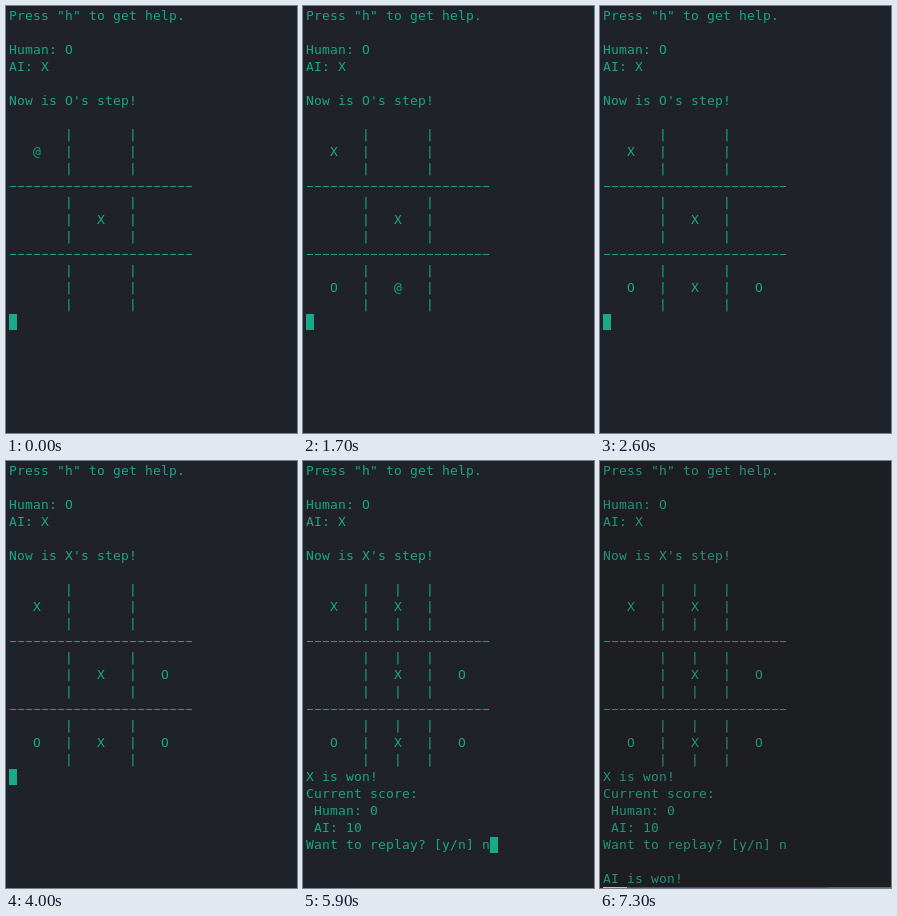
Recreate the animation shown at these times as an HTML page. Size 291 px wide and 427 px high, loop 7500 ms.

```html
<!DOCTYPE html>
<html lang="en">
<head>
<meta charset="utf-8">
<title>Tic-tac-toe in a terminal</title>
<style>
  html, body { margin: 0; width: 100%; height: 100%; overflow: hidden; }
  #screen { position: relative; width: 291px; height: 427px; overflow: hidden;
            background: #1f2229; color: #1aa586; }
  #screen.dim { background: #1c1e22; color: #24917a; }
  #screen > * { position: absolute; }
  /* One character per 8 x 17 px cell, whatever the measured advance is. */
  #lines { left: 3px; top: 1px; margin: 0; font: 13px/17px "DejaVu Sans Mono", monospace;
           letter-spacing: calc(8px - 1ch); font-variant-ligatures: none; }
  .rule { left: 4px; width: 182px; height: 1px;
          background: repeating-linear-gradient(90deg, currentColor 0 6px, transparent 6px 8px); }
  #cursor { width: 8px; height: 16px; background: #1aa88a; }
  #prompt { left: 3px; top: 426px; width: 288px; height: 1px;
            background: linear-gradient(90deg, #f4f5f5 24px, #23788c 24px 225px, #5f9a2c 225px); }
  .dim #prompt { opacity: .75; }
</style>
</head>
<body>
<div id="screen">
  <pre id="lines"></pre>
  <div class="rule" style="top: 180px"></div>
  <div class="rule" style="top: 248px"></div>
  <div id="cursor"></div>
  <div id="prompt"></div>
</div>
<script>
const LOOP = 7500, CELL_W = 8, CELL_H = 17, LEFT = 3, TOP = 2;
const $ = id => document.getElementById(id);

// Cells run left to right, top to bottom; "@" is the selection.
const steps = [
  { at: 0,    cells: "@   X    ", turn: "O" },
  { at: 300,  cells: "   @X    ", turn: "O" },
  { at: 600,  cells: "    X @  ", turn: "O" },
  { at: 1000, cells: "    X O  ", turn: "X" },
  { at: 1100, cells: "X   X O  ", turn: "O" },
  { at: 1700, cells: "X   X O@ ", turn: "O" },
  { at: 2200, cells: "X   X O @", turn: "O" },
  { at: 2600, cells: "X   X OXO", turn: "O" },
  { at: 3400, cells: "X   X@OXO", turn: "O" },
  { at: 4000, cells: "X   XOOXO", turn: "X" },
  { at: 4100, cells: "XX  XOOXO", turn: "X", won: true },
  { at: 5900, cells: "XX  XOOXO", turn: "X", won: true, reply: "n" },
  { at: 6500, cells: "XX  XOOXO", turn: "X", won: true, reply: "n", done: true },
  { at: 7300, cells: "XX  XOOXO", turn: "X", won: true, reply: "n", done: true, dim: true }
];

const boardRow = marks => [...marks].map(m => `   ${m}   `).join("|");

// The blank line between board rows holds a dashed rule.
function board({ cells, won }) {
  const pad = boardRow(won ? " | " : "   ");
  return [0, 3, 6].flatMap(i => [
    ...(i ? [""] : []), pad, boardRow(cells.slice(i, i + 3)), pad
  ]);
}

function screenLines(step) {
  const lines = [
    'Press "h" to get help.', "", "Human: O", "AI: X", "",
    `Now is ${step.turn}'s step!`, "", ...board(step)
  ];
  if (step.won) {
    lines.push("X is won!", "Current score:", " Human: 0", " AI: 10",
      "Want to replay? [y/n] " + (step.reply || ""));
  } else {
    lines.push("");
  }
  if (step.done) lines.push("", "AI is won!");
  return lines;
}

function show(step) {
  const lines = screenLines(step);
  const last = lines.length - 1;
  $("lines").textContent = lines.join("\n");
  $("cursor").style.left = LEFT + lines[last].length * CELL_W + "px";
  $("cursor").style.top = TOP + last * CELL_H + "px";
  $("cursor").hidden = !!step.done;
  $("prompt").hidden = !step.done;
  $("screen").classList.toggle("dim", !!step.dim);
}

const start = performance.now();
let current;

function tick() {
  const t = (performance.now() - start) % LOOP;
  const step = steps.findLast(s => s.at <= t);
  if (step !== current) show(current = step);
  requestAnimationFrame(tick);
}
tick();
</script>
</body>
</html>
```
